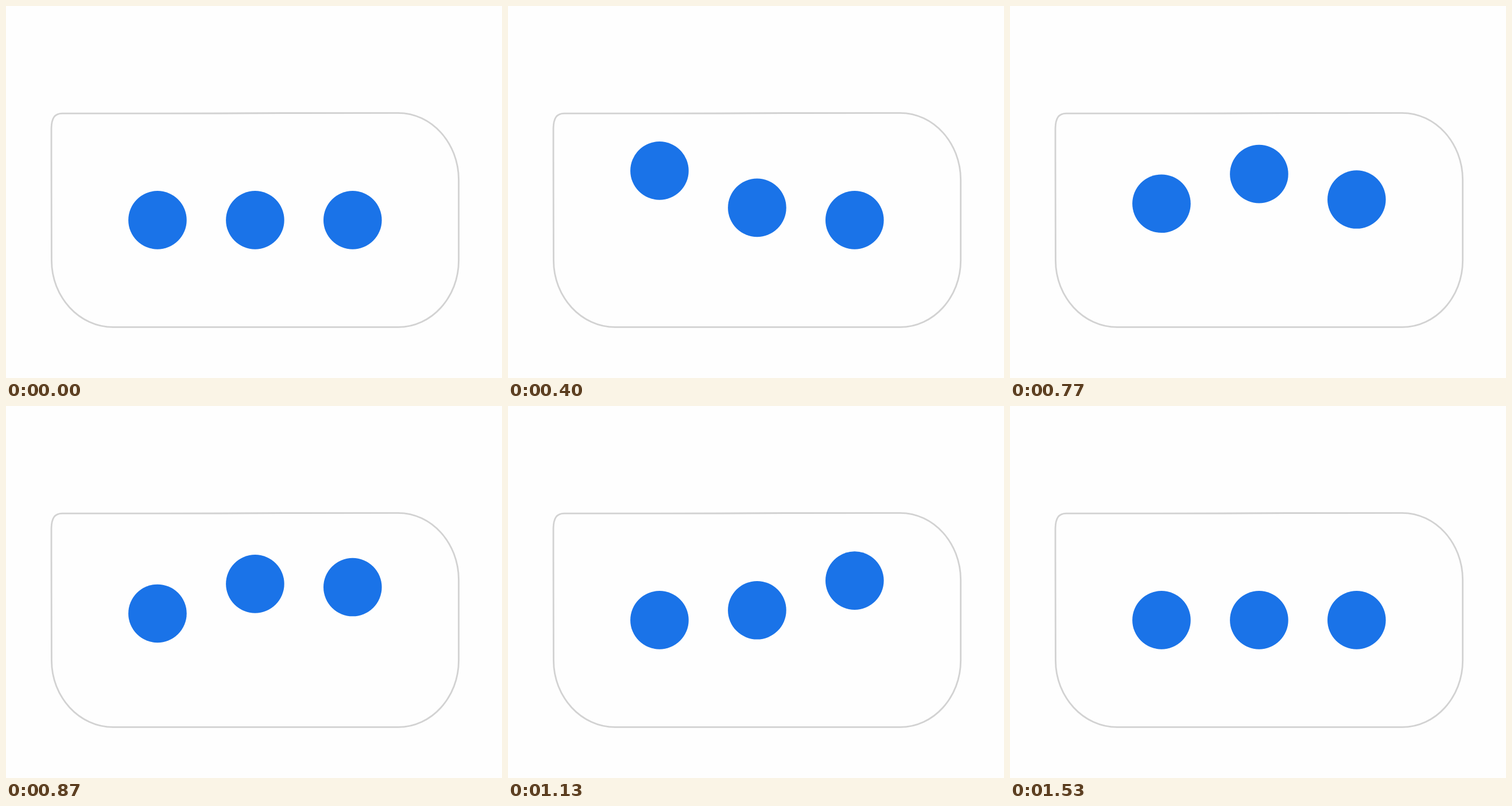
Animation of 864 by 648 pixels, one loop 2.01 s. Source, as an HTML page:

```html
<!DOCTYPE html>
<html lang="en">
<head>
<meta charset="utf-8">
<title>Typing indicator</title>
<style>
  html, body { margin: 0; width: 100%; height: 100%; overflow: hidden; background: #fefefe; }
  svg { display: block; width: 864px; height: 648px; }
  .bubble { fill: none; stroke: #d2d2d2; stroke-width: 2.8; stroke-linejoin: round; }
  .dot { fill: #1a73e8; }
</style>
</head>
<body>
<svg viewBox="0 0 864 648">
  <path class="bubble" d="M98 187.1 L375 187 L486 186.5 L683 186.3
    C741.5 186.3 788.6 239 788.6 303 V443
    C788.6 507 741.5 559.4 683 559.4 H187
    C127.5 559.4 79.4 507 79.4 443 L79 255 V213
    C79.4 195 85 187.1 98 187.1 Z"/>
  <circle class="dot" cx="263.9" cy="372.9" r="50.8"/>
  <circle class="dot" cx="433.9" cy="372.9" r="50.8"/>
  <circle class="dot" cx="603.8" cy="372.9" r="50.8"/>
</svg>
<script>
  const LOOP = 2010;
  const REST = 372.9, LIFT = 86;
  const RISE = 12, HOLD = 1, FALL = 15, STAGGER = 9; // in ticks, 30 per second
  const dots = document.querySelectorAll('.dot');

  // Ticks last 30, 40 and 30 ms in turn.
  function tickAt(ms) {
    const rest = ms % 100;
    return 3 * Math.floor(ms / 100) + (rest >= 30) + (rest >= 70);
  }

  function lift(tick) {
    const up = tick / RISE;
    const down = (RISE + HOLD + FALL - tick) / FALL;
    return LIFT * Math.max(0, Math.min(1, up, down));
  }

  function draw(ms) {
    const tick = tickAt(ms % LOOP);
    dots.forEach((dot, i) => dot.setAttribute('cy', REST - lift(tick - i * STAGGER)));
  }

  let start;
  function loop(now) {
    start ??= now;
    draw(now - start);
    requestAnimationFrame(loop);
  }
  draw(0);
  requestAnimationFrame(loop);
</script>
</body>
</html>
```
